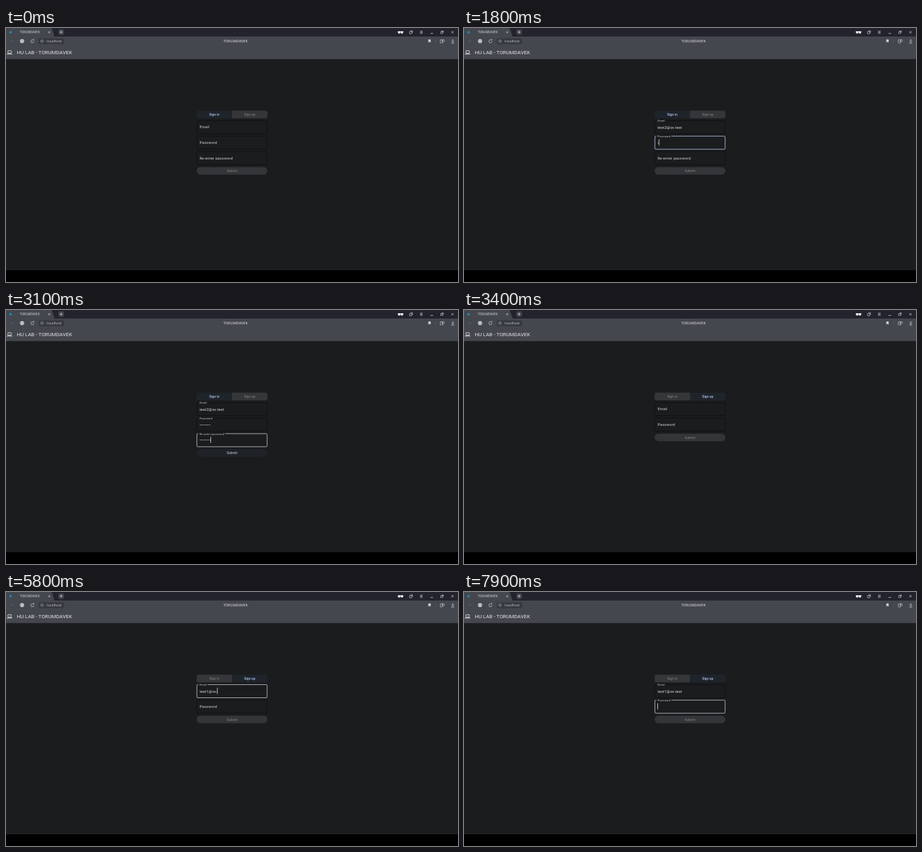
Recreate the animation shown at these times as an HTML page with a canvas. Size 690x388 px, loop 8000 ms.

```html
<!DOCTYPE html>
<html lang="en">
<head>
<meta charset="utf-8">
<title>Sign in form</title>
<style>
html, body { margin: 0; width: 100%; height: 100%; overflow: hidden; background: #000; }
canvas { display: block; width: 690px; height: 388px; }
</style>
</head>
<body>
<canvas id="stage"></canvas>
<script>
const W = 690, H = 388, LOOP = 8000, STEP = 100, SWAP = 3200;
const NAME = 'TORUMDAVEK';
const canvas = document.getElementById('stage');
const ctx = canvas.getContext('2d');
const dpr = window.devicePixelRatio || 1;
canvas.width = W * dpr;
canvas.height = H * dpr;

const PAGE = '#1a1c1e', BAR = '#44474e', ICON = '#d0d2d6';
const BODY = 5.75, SMALL = 4.3;

const ramp = (t, a, b) => Math.min(1, Math.max(0, (t - a) / (b - a)));
const mix = (a, b, k) => a + (b - a) * k;
const blend = (a, b, k) =>
  'rgb(' + a.map((v, i) => Math.round(mix(v, b[i], k))).join(',') + ')';

// Value of the last [time, value] pair that has been reached
function reached(t, pairs) {
  let value = 0;
  for (const [at, v] of pairs) if (t >= at) value = v;
  return value;
}

function rect(x, y, w, h, color) {
  ctx.fillStyle = color;
  ctx.fillRect(x, y, w, h);
}

function round(x, y, w, h, r, color) {
  ctx.fillStyle = color;
  ctx.beginPath();
  ctx.roundRect(x, y, w, h, r);
  ctx.fill();
}

function frame(x, y, w, h, r, color, lw = 0.8) {
  ctx.strokeStyle = color;
  ctx.lineWidth = lw;
  ctx.beginPath();
  ctx.roundRect(x, y, w, h, r);
  ctx.stroke();
}

function line(points, color = ICON, lw = 0.8) {
  ctx.strokeStyle = color;
  ctx.lineWidth = lw;
  ctx.beginPath();
  points.forEach(([x, y], i) => i ? ctx.lineTo(x, y) : ctx.moveTo(x, y));
  ctx.stroke();
}

function arc(x, y, r, color, from = 0, to = Math.PI * 2, lw = 0.7) {
  ctx.strokeStyle = color;
  ctx.lineWidth = lw;
  ctx.beginPath();
  ctx.arc(x, y, r, from, to);
  ctx.stroke();
}

function disc(x, y, r, color) {
  ctx.fillStyle = color;
  ctx.beginPath();
  ctx.arc(x, y, r, 0, Math.PI * 2);
  ctx.fill();
}

// Text centred vertically on y by its capital height; returns its width
function text(str, x, y, size, color, opt = {}) {
  const { family = 'Roboto', weight = 400, align = 'left', gap = 0 } = opt;
  ctx.font = `${weight} ${size}px ${family}, sans-serif`;
  ctx.letterSpacing = gap + 'px';
  ctx.textAlign = align;
  ctx.fillStyle = color;
  ctx.fillText(str, x, y + size * 0.355);
  return ctx.measureText(str).width;
}

function cross(x, y, r) {
  line([[x - r, y - r], [x + r, y + r]]);
  line([[x + r, y - r], [x - r, y + r]]);
}

function drawBrowser() {
  rect(0, 0, W, 13, '#23232d');
  rect(0, 13, W, 34.5, BAR);

  ctx.fillStyle = BAR;
  ctx.beginPath();
  ctx.moveTo(0, 0);
  ctx.lineTo(68, 0);
  ctx.quadraticCurveTo(70, 0, 71, 3);
  ctx.lineTo(74, 13);
  ctx.lineTo(0, 13);
  ctx.fill();
  disc(7, 6.5, 2, '#1c87ab');
  const ui = { family: '"Open Sans"' };
  text(NAME, 21, 6.6, 4.6, '#e2e3e6', ui);
  cross(66, 6.5, 1.4);
  round(80, 2, 8.5, 8.5, 2, '#41434b');
  line([[82, 6.3], [86.4, 6.3]]);
  line([[84.2, 4.1], [84.2, 8.5]]);

  // window controls
  disc(600.2, 6.7, 1.9, '#f2f2f4');
  disc(604.4, 6.7, 1.9, '#f2f2f4');
  rect(598, 5, 8.6, 1, '#f2f2f4');
  frame(616, 5.4, 3.4, 3.4, 0.4, ICON, 0.7);
  line([[617.4, 4.2], [620.6, 4.2], [620.6, 7.4]], ICON, 0.7);
  for (const y of [4.8, 6.5, 8.2]) line([[632, y], [636, y]], ICON, 0.7);
  line([[648, 8.3], [652, 8.3]]);
  frame(663.6, 5.6, 3, 2.8, 0.2, ICON, 0.7);
  line([[664.8, 4.5], [667.7, 4.5], [667.7, 7.2]], ICON, 0.7);
  cross(681.5, 6.5, 1.7);

  // toolbar
  line([[11, 20], [7, 20], [8.7, 18.3]], '#5d6067', 0.7);
  line([[7, 20], [8.7, 21.7]], '#5d6067', 0.7);
  disc(24.5, 20, 3.2, '#b9bbc0');
  arc(40.2, 20.3, 2.3, ICON, -0.2, 5);
  line([[40.4, 18.2], [42.4, 18.4], [42.4, 16.6]], ICON, 0.7);
  round(50, 15.7, 39, 9, 2, '#373940');
  arc(55, 20, 2.1, '#a7a9af', 0, Math.PI * 2, 0.6);
  line([[53, 20], [57, 20]], '#a7a9af', 0.5);
  text('localhost', 62, 20.3, 5.5, '#c3c5ca', ui);
  text(NAME, 350.3, 20.3, 5.6, '#eceded', { ...ui, align: 'center' });

  ctx.fillStyle = ICON;
  ctx.beginPath();
  for (const [x, y] of [[644.7, 17.5], [648.3, 17.5], [648.3, 22.3], [646.5, 21], [644.7, 22.3]]) ctx.lineTo(x, y);
  ctx.fill();
  line([[656, 17], [656, 23]], '#5c5f66', 0.6);
  frame(663, 18, 3.6, 4.8, 0.8, ICON, 0.7);
  arc(667.4, 19.3, 1.7, ICON);
  line([[682, 17], [682, 21.2]]);
  line([[680.3, 19.6], [682, 21.3], [683.7, 19.6]]);
  line([[679.7, 23], [684.3, 23]]);

  // page header
  frame(2.9, 34.7, 5.2, 3.8, 0.4, '#eceef0', 0.8);
  line([[1.3, 39.8], [9.7, 39.8]], '#eceef0', 0.9);
  text('HU LAB - ' + NAME, 16.4, 37.2, 7.9, '#e4e5e8');
}

function drawField(y, f) {
  const edge = blend([13, 14, 16], f.ring || [184, 188, 194], f.focus);
  frame(291.4, y + 0.5, 107.2, 20, 1.6, edge, mix(0.7, 0.9, f.focus));
  const size = mix(BODY, SMALL, f.up);
  const gap = size * 0.03;
  const color = blend([214, 215, 218], [200, 203, 208], f.up);
  if (f.up > 0.5) {
    ctx.font = `400 ${SMALL}px Roboto, sans-serif`;
    ctx.letterSpacing = '0.13px';
    rect(293.6, y - 0.6, ctx.measureText(f.label).width + 3, 2.2, PAGE);
  }
  text(f.label, 295.4, mix(y + 10.4, y + 0.6, f.up), size, color, { gap });
  if (f.up < 1) return;
  const width = text(f.value, 295.4, y + 10.8, BODY, '#e6e7e9', { gap: 0.18 });
  if (f.focus > 0.9 && f.caret) rect(295.3 + width, y + 5.3, 0.8, 9.4, '#e8e9eb');
}

function drawTabs(k) {
  const on = [31, 36, 42], off = [53, 54, 57];
  const lit = [176, 199, 246], dim = [117, 119, 123];
  const opt = { weight: 500, align: 'center', gap: 0.04 };
  round(291, 126.3, 54, 11.7, [3, 0, 0, 3], blend(on, off, k));
  round(345, 126.3, 54, 11.7, [0, 3, 3, 0], blend(off, on, k));
  text('Sign in', 318, 132.2, 5.03, blend(lit, dim, k), opt);
  text('Sign up', 372, 132.2, 5.03, blend(dim, lit, k), opt);
}

function drawSubmit(y, k) {
  round(291, y, 108, 11.6, 5.8, blend([52, 53, 56], [31, 34, 39], k));
  text('Submit', 345, y + 5.9, 5.03, blend([117, 118, 121], [176, 184, 196], k),
    { weight: 500, align: 'center', gap: 0.04 });
}

const dots = n => '\u2022'.repeat(n);

function drawRegister(t, caret) {
  const typed = reached(t, [[400, 1], [500, 3], [600, 4], [800, 5], [900, 6],
    [1100, 9], [1200, 10], [1300, 11], [1400, 12], [1500, 13]]);
  const toEmail = ramp(t, 0, 300), toPass = ramp(t, 1600, 1800), toAgain = ramp(t, 2500, 2700);
  const passLen = Math.min(8, Math.max(0, Math.floor((t - 1700) / 100)));
  const againLen = reached(t, [[2700, 2], [2800, 4], [2900, 5], [3000, 7], [3100, 8]]);
  drawField(141, { label: 'Email', up: toEmail, focus: toEmail * (1 - toPass),
    value: 'test2@ov.test'.slice(0, typed), caret, ring: [190, 191, 176] });
  drawField(164.7, { label: 'Password', up: toPass, focus: toPass * (1 - toAgain),
    value: dots(passLen), caret, ring: [172, 192, 216] });
  drawField(188.4, { label: 'Re-enter password', up: toAgain, focus: toAgain,
    value: dots(againLen), caret });
  drawSubmit(212.5, againLen === 8 ? 1 : 0);
}

function drawLogin(t, caret) {
  const typed = reached(t, [[4300, 1], [4400, 3], [4500, 4], [4900, 5], [5000, 6],
    [5800, 9], [5900, 10], [6000, 12], [6100, 13]]);
  const toEmail = ramp(t, 3900, 4200), toPass = ramp(t, 6200, 6400);
  const passLen = reached(t, [[6600, 2], [6700, 3], [6800, 5], [6900, 6], [7300, 5],
    [7400, 4], [7500, 3], [7600, 2], [7700, 1], [7800, 0]]);
  drawField(141, { label: 'Email', up: toEmail, focus: toEmail * (1 - toPass),
    value: 'test1@ov.test'.slice(0, typed), caret });
  drawField(164.7, { label: 'Password', up: toPass, focus: toPass,
    value: dots(passLen), caret });
  drawSubmit(188.9, t >= 6600 ? 1 - ramp(t, 7700, 7900) : 0);
}

const blinks = [[4500, 4700], [5200, 5600], [7100, 7300]];

function draw(t) {
  ctx.setTransform(dpr, 0, 0, dpr, 0, 0);
  rect(0, 0, W, H, '#000');
  rect(0, 0, W, 370, PAGE);
  drawBrowser();
  if (t >= 3500 && t < 5000) rect(0, 366.3, W, 3.7, BAR);
  else if (t >= 5000) rect(0, 369, W, 1, '#222427');
  drawTabs(ramp(t, SWAP - 100, SWAP + 200));
  const caret = !blinks.some(([a, b]) => t >= a && t < b);
  (t < SWAP ? drawRegister : drawLogin)(t, caret);
}

const start = performance.now();
function tick() {
  const t = (performance.now() - start) % LOOP;
  draw(Math.floor(t / STEP) * STEP);
  requestAnimationFrame(tick);
}
tick();
</script>
</body>
</html>
```
